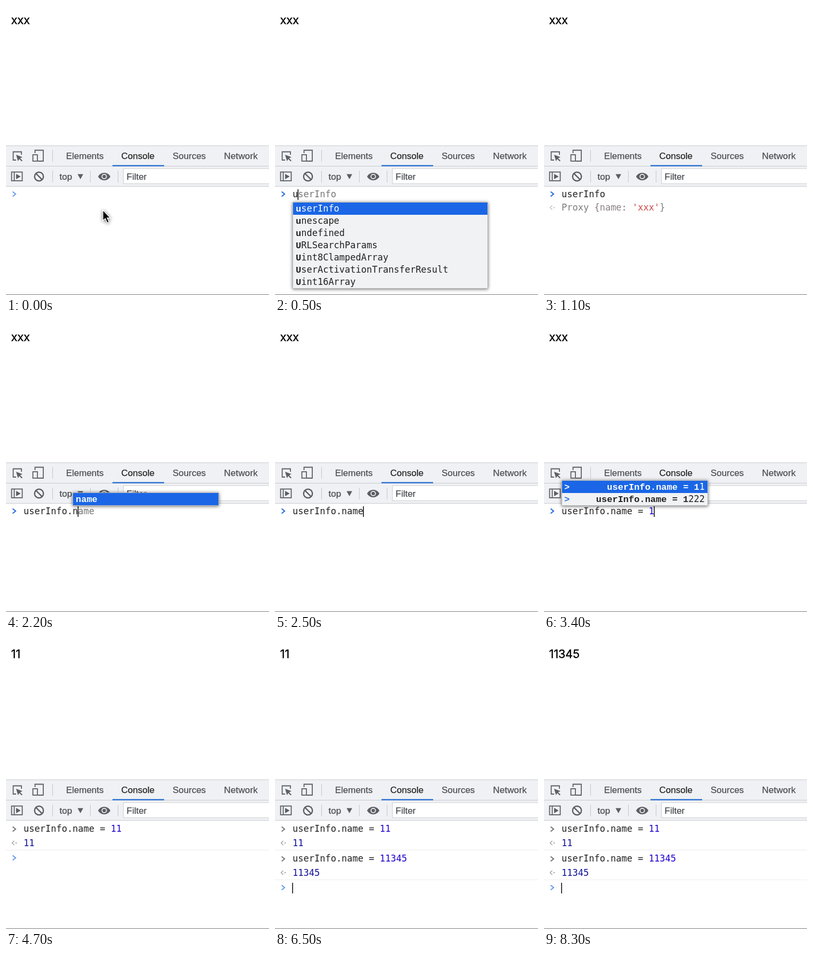
Recreate the animation shown at these times as an HTML page. Size 494 px wide and 544 px high, loop 8400 ms.

```html
<!DOCTYPE html>
<html lang="en">
<head>
<meta charset="utf-8">
<title>Console demo</title>
<style>
  html, body { margin: 0; width: 100%; height: 100%; overflow: hidden; background: #fff; }
  svg { display: block; }
  text { white-space: pre; }
  .ui { font: 17px "Liberation Sans", Arial, sans-serif; fill: #4a4d51; stroke: #4a4d51; stroke-width: .25; }
  .ui .active { fill: #222; stroke: #222; }
  .code { font: 17px "DejaVu Sans Mono", monospace; fill: #222; }
  .pop { font: 17px "DejaVu Sans Mono", monospace; }
  .pop tspan { font: bold 17px "Liberation Mono", monospace; }
  .box { filter: drop-shadow(0 1px 3px #0009); }
  .page { font: 22px Inter, sans-serif; letter-spacing: -.3px; stroke: #000; stroke-width: .35; }
  .num { fill: #1c00cf; }
  .result { fill: #10109a; }
  .icon { fill: none; stroke: #5b5e62; stroke-width: 1.8; }
  .solid { fill: #5b5e62; stroke: none; }
  .chevron { fill: none; stroke-width: 2; }
</style>
</head>
<body>
<svg width="494" height="544" viewBox="0 0 494 544">
  <rect width="494" height="544" fill="#fff"/>
  <text id="page" class="page" x="9.5" y="33.7"></text>

  <rect y="263" width="494" height="77" fill="#eff1f4"/>
  <path d="M0 263H494M0 301.5H494M0 339.5H494" stroke="#c6c9cd"/>
  <path d="M87.5 271V293M87.5 310V332M158.5 310V332M210.5 310V332" stroke="#c4c7cb"/>
  <rect x="200" y="299.5" width="97" height="2.2" fill="#1a67d2"/>
  <rect x="220.5" y="306" width="290" height="28.5" fill="#fff" stroke="#cbced2"/>

  <g class="ui">
    <text x="112.7" y="288">Elements</text>
    <text x="216.5" y="288" class="active">Console</text>
    <text x="313" y="288">Sources</text>
    <text x="409.5" y="288" letter-spacing=".15">Network</text>
    <text x="100.5" y="326.5">top</text>
    <text x="226.5" y="327">Filter</text>
  </g>

  <g class="icon">
    <path d="M29 280V274.5H13.5V290H19"/>
    <path class="solid" d="M19 280L31 284.5L26.5 286.5L31 291L29.5 292.5L25 288L22.5 292Z"/>
    <path d="M54.5 277V271.5H70V292H60"/>
    <rect x="50.5" y="280" width="8.5" height="12"/>
    <rect x="10.5" y="312.5" width="20" height="16.5"/>
    <path d="M15.5 312.5V329"/>
    <path class="solid" d="M19 316L27.5 321L19 326Z"/>
    <circle cx="62" cy="321" r="8.3" stroke-width="2.4"/>
    <path d="M56.3 315.3L67.7 326.7" stroke-width="2.4"/>
    <path class="solid" d="M134.5 316.5H145L139.8 326Z"/>
    <path class="solid" d="M173 321C177.5 311.5 191.5 311.5 196 321C191.5 330.5 177.5 330.5 173 321Z"/>
    <circle cx="184.5" cy="321" r="4.2" style="stroke:#eff1f4"/>
  </g>

  <g id="console"></g>
  <path d="M0 543.5H494" stroke="#77797c"/>
  <path id="mouse" class="box" d="M182 384V404L186.5 400L190 408L193.5 406.5L190 399H196Z" stroke="#fff" stroke-width="1.3"/>
</svg>

<script>
const LOOP = 8400, CHAR = 10.235, LEFT = 33, ROW = 23;
const $ = id => document.getElementById(id);

const past = ['11', '1222', '12', '123', '345'].map(v => '>userInfo.name = ' + v);
const globals = ['userInfo', 'unescape', 'undefined', 'URLSearchParams', 'Uint8ClampedArray',
  'UserActivationTransferResult', 'Uint16Array'];

// A leading ">" marks an earlier command; "bold" counts the matched letters.
const lists = {
  globals: { x: 34, y: 370, w: 365, bold: 1, rows: globals },
  members: { x: 34, y: 370, w: 273, bold: 9, rows: [...past, '>userInfo.name', 'name'] },
  name: { x: 126, y: 320, w: 273, bold: 4, rows: ['name'] },
  past: { x: 34, y: 370, w: 273, bold: 13, rows: past },
  ones: { x: 34, y: 297, w: 273, bold: 17, rows: past.slice(0, 2) },
};

// Each step changes only the fields it names.
const steps = [
  [0, { page: 'xxx', text: '', hint: '', list: '', caret: 0, preview: 0, log: [], mouse: 1 }],
  [100, { mouse: 0, text: 'u', caret: 1 }],
  [200, { hint: 'serInfo', list: 'globals' }],
  [1000, { text: 'userInfo', hint: '', list: '' }],
  [1100, { preview: 1, caret: 0 }],
  [1700, { text: 'userInfo.', preview: 0, caret: 1 }],
  [1800, { list: 'members' }],
  [2200, { text: 'userInfo.n', hint: 'ame', list: 'name' }],
  [2300, { text: 'userInfo.na', hint: 'me' }],
  [2400, { text: 'userInfo.nam', hint: 'e' }],
  [2500, { text: 'userInfo.name', hint: '', list: '' }],
  [2600, { list: 'past' }],
  [2900, { text: 'userInfo.name ', list: '' }],
  [3000, { text: 'userInfo.name =' }],
  [3200, { text: 'userInfo.name = ' }],
  [3300, { text: 'userInfo.name = 1' }],
  [3400, { list: 'ones' }],
  [3500, { hint: '1' }],
  [3800, { text: 'userInfo.name = 11', hint: '', list: '' }],
  [4000, { text: '', log: ['11'] }],
  [4100, { page: '11' }],
  [4700, { caret: 0 }],
  [4800, { text: 'userInfo.name = 11', caret: 1 }],
  [5300, { caret: 0 }],
  [5800, { text: 'userInfo.name = 113', caret: 1 }],
  [5900, { text: 'userInfo.name = 1134' }],
  [6200, { text: 'userInfo.name = 11345' }],
  [6500, { text: '', log: ['11', '11345'] }],
  [6600, { page: '11345' }],
  [7200, { caret: 0 }],
  [7800, { caret: 1 }],
];

const line = (y, body, cls = '') => `<text class="code ${cls}" x="${LEFT}" y="${y}">${body}</text>`;
const paint = code => code.replace(/\d+$/, '<tspan class="num">$&</tspan>');
const chevron = (y, color) =>
  `<path class="chevron" stroke="${color}" d="M12.5 ${y - 4.5}L18 ${y}L12.5 ${y + 4.5}"/>`;
const reply = (y, color) =>
  `<path class="chevron" stroke="${color}" style="stroke-width:1.6" d="M15.5 ${y - 4}L11.5 ${y}L15.5 ${y + 4}"/>
   <circle cx="19" cy="${y}" r="1.3" fill="${color}"/>`;

function entry(value, i) {
  const y = 361 + i * 56;
  return chevron(y - 5, '#747679') + line(y, paint('userInfo.name = ' + value)) +
    reply(y + 21, '#a4a6a9') + line(y + 27, value, 'result') +
    `<path d="M0 ${y + 34.5}H494" stroke="#ececec"/>`;
}

function popup({ x, y, w, bold, rows }) {
  const h = rows.length * ROW;
  const box = `<rect class="box" x="${x - 1}" y="${y - 1}" width="${w + 2}" height="${h + 2}" fill="#b9bcc0"/>
    <rect x="${x}" y="${y}" width="${w}" height="${h}" fill="#f1f2f4"/>
    <rect x="${x}" y="${y}" width="${w}" height="${ROW}" fill="#1a66e6"/>`;
  return box + rows.map((row, i) => {
    const old = row[0] === '>', word = old ? row.slice(1) : row;
    const base = y + i * ROW + 17;
    const place = old ? `x="${x + w - 5}" text-anchor="end"` : `x="${x + 5}"`;
    const mark = old ? `<text class="pop" x="${x + 4}" y="${base}" fill="${i ? '#2f74e0' : '#fff'}"><tspan>&gt;</tspan></text>` : '';
    return mark + `<text class="pop" ${place} y="${base}" fill="${i ? '#222' : '#fff'}"><tspan>${word.slice(0, bold)}</tspan>${word.slice(bold)}</text>`;
  }).join('');
}

function draw(s) {
  const y = 360 + s.log.length * 56;
  let out = s.log.map(entry).join('') + chevron(y - 6, s.text ? '#2268dd' : '#659bea') +
    line(y, paint(s.text) + `<tspan fill="#777">${s.hint}</tspan>`);
  if (s.preview) {
    out += reply(379.5, '#c3c5c8') +
      line(385, `<tspan fill="#7d7d7d">Proxy {<tspan fill="#8b8088">name</tspan>: <tspan fill="#cc4b4b">'xxx'</tspan>}</tspan>`);
  }
  if (s.caret) out += `<rect x="${LEFT - .7 + s.text.length * CHAR}" y="${y - 15}" width="1.5" height="20"/>`;
  if (s.list) out += popup(lists[s.list]);
  $('console').innerHTML = out;
  $('page').textContent = s.page;
  $('mouse').style.display = s.mouse ? '' : 'none';
}

let shown = 0;
function tick() {
  const now = performance.now() % LOOP;
  const due = steps.filter(([t]) => t <= now);
  if (due.length !== shown) {
    shown = due.length;
    draw(Object.assign({}, ...due.map(step => step[1])));
  }
  requestAnimationFrame(tick);
}
tick();
</script>
</body>
</html>
```
